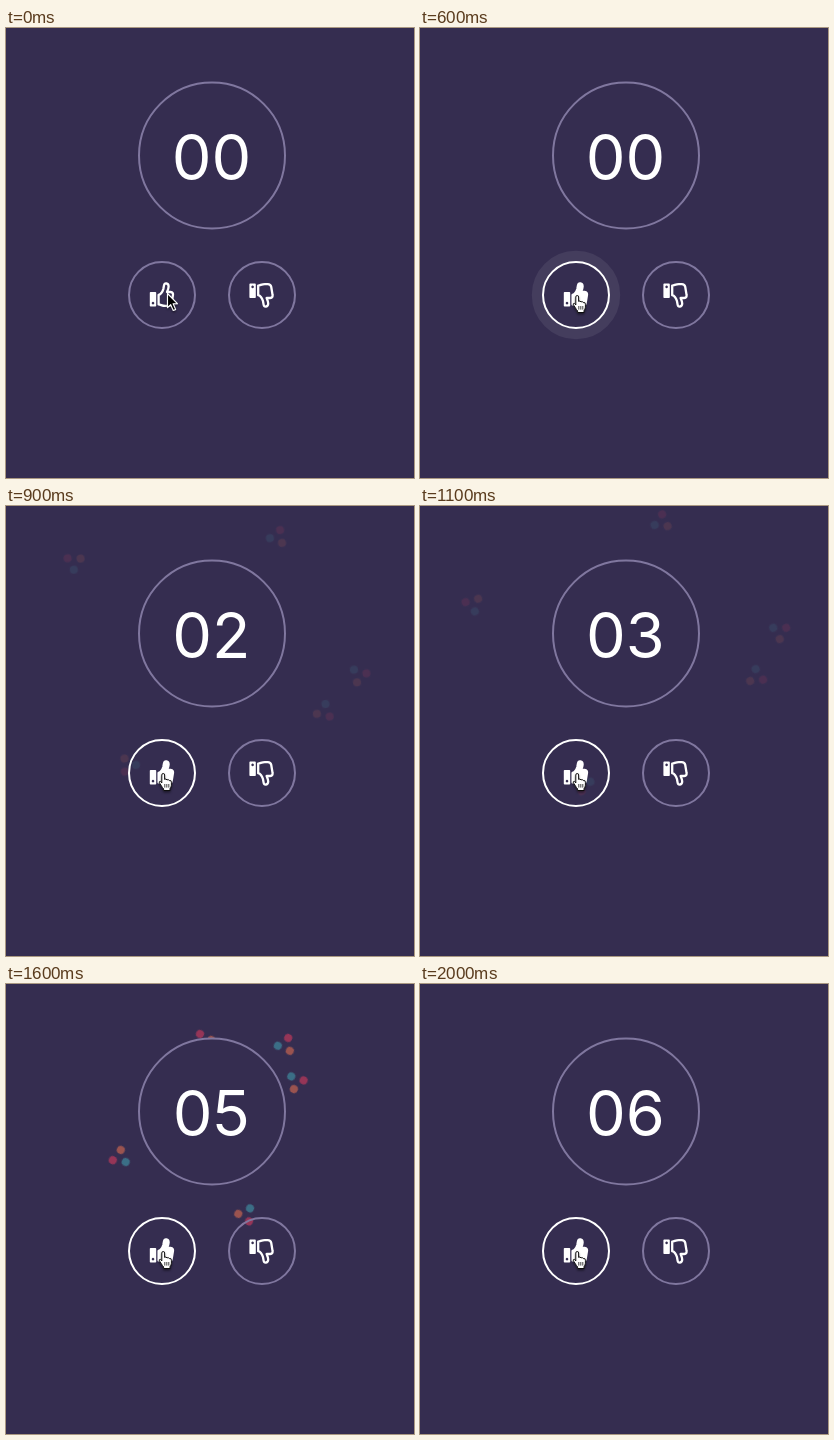
An HTML page that plays this animation: 408 by 450 pixels, repeating every 2100 ms.

```html
<!DOCTYPE html>
<html lang="en">
<head>
<meta charset="utf-8">
<title>Vote counter</title>
<style>
  html, body { margin: 0; width: 100%; height: 100%; overflow: hidden; background: #352d50; }
  svg { display: block; width: 100%; height: 100%; }
  .ring { fill: none; stroke: #80779f; stroke-width: 2; }
  .face { fill: #352d50; }
  .count { font: 400 63px Inter, Roboto, sans-serif; fill: #fff; text-anchor: middle; }
  .palm { stroke: #fff; stroke-width: 2.3; stroke-linejoin: round; }
  use { fill: none; }
  .hover use { fill: #fff; }
  .hover .ring { stroke: #fff; }
  .ripple { fill: none; stroke: #fff; }
</style>
</head>
<body>
<svg viewBox="0 0 408 450">
  <defs>
    <g id="thumb">
      <path fill="#fff" fill-rule="evenodd" d="M-11.4-3h4.8q.8 0 .8.8V10.7q0 .8-.8.8H-11.4q-.8 0-.8-.8V-2.2q0-.8.8-.8zM-9 6.8a1.3 1.3 0 1 0 .01 0z"/>
      <path class="palm" d="M-3.4-.2C-1.2-.8.6-3.6 1.4-6.2L2-9.6C2.5-12.4 6.6-12.2 6.6-8.6C6.6-6.6 5.6-4.4 5-3H8.6C10.8-3 11.3-1.2 10.9.4L9.6 8.2C9.2 10 8.2 10.9 6.2 10.9H3.2C.2 10.9-1.2 9.6-3.4 9.4z"/>
    </g>
    <filter id="shade" x="-50%" y="-50%" width="200%" height="200%">
      <feDropShadow dx="0" dy="1.5" stdDeviation="1.2" flood-color="#000" flood-opacity=".5"/>
    </filter>
  </defs>

  <g id="bursts"></g>

  <circle class="ring face" cx="206" cy="127.5" r="73"/>
  <text class="count" id="count" x="205.4" y="152">00</text>

  <circle class="ripple" id="ripple" cx="156" cy="267"/>
  <g id="up" transform="translate(156 267)">
    <circle class="ring" r="33"/>
    <use href="#thumb"/>
  </g>
  <g transform="translate(256 267)">
    <circle class="ring" r="33"/>
    <use href="#thumb" transform="translate(-.4 0) scale(1 -1)"/>
  </g>

  <path id="arrow" filter="url(#shade)" fill="#000" stroke="#fff" stroke-width="1.1" stroke-linejoin="round"
    d="M.5.5V14.6L3.7 11.6L6.2 17.4L8.6 16.4L6.1 10.7H10.4z"/>
  <g id="hand" transform="translate(152.6 267)" filter="url(#shade)">
    <path id="skin" stroke="#111" stroke-width="1" stroke-linejoin="round"
      d="M3.2 10V2Q3.2.5 4.6.5T6 2V6.4Q7.4 5.4 8.4 6.9Q9.8 6 10.6 7.5Q12.8 6.9 12.8 9.2V12.2Q12.6 14.4 11.4 15.6V17.5H5V15.8Q3.6 14.6 2.6 12.4L.8 9.8Q.4 8.2 1.8 8.3Z"/>
    <path fill="none" stroke="#111" stroke-width=".8" d="M6.2 11v3.6M8.2 11v3.6M10.2 11v3.6"/>
  </g>
</svg>
<script>
const LOOP = 2100, TICK = 100, LIFE = 300;
const NS = 'http://www.w3.org/2000/svg';
const $ = id => document.getElementById(id);
const add = (parent, tag) => parent.appendChild(document.createElementNS(NS, tag));
const set = (el, attrs) => { for (const k in attrs) el.setAttribute(k, attrs[k]); };
const show = (el, on) => el.setAttribute('visibility', on ? 'visible' : 'hidden');

// Each trio flies through two points and keeps its own tilt.
const trios = [
  { near: [-84, -59.5], far: [-123.7, -88.7], tilt: 100 },
  { near: [58.5, -40.1], far: [77.7, -82.7], tilt: 180 },
  { near: [92.5, 33.5], far: [136.7, 61.7], tilt: 235 },
  { near: [65, 60.6], far: [97.3, 92.3], tilt: 290 },
  { near: [-75.4, 78.2], far: [-100.7, 116], tilt: 7 }
];
const colors = ['#3f9fb0', '#e0395c', '#e8704e'];

// [start in ms, rotation in degrees]
const bursts = [[702, -8.5], [900, -25], [1110, 0], [1265, -40.5], [1500, -62], [1665, 8]]
  .map(([start, turn]) => {
    const g = add($('bursts'), 'g');
    set(g, { transform: `translate(206 127) rotate(${turn})` });
    const parts = trios.map(({ tilt }) => {
      const trio = add(g, 'g');
      colors.forEach((fill, i) => {
        const a = (tilt + i * 120) * Math.PI / 180;
        set(add(trio, 'circle'), { cx: 7.5 * Math.cos(a), cy: 7.5 * Math.sin(a), r: 4, fill });
      });
      return trio;
    });
    return { start, g, parts };
  });

function drawBurst({ start, g, parts }, t) {
  const u = (t - start) / LIFE;
  const live = u >= 0 && u < 1;
  show(g, live);
  if (!live) return;
  const spread = 1.12 * (1 - (1 - u) ** 2);
  const k = (spread - 0.62) / 0.35;
  set(g, { opacity: Math.min(1, 1.38 * (1 - u) ** 2.2) });
  parts.forEach((el, i) => {
    const { near, far } = trios[i];
    const [x, y] = near.map((n, j) => n + (far[j] - n) * k);
    set(el, { transform: `translate(${x} ${y})` });
  });
}

function drawRipple(t) {
  const grow = Math.min(1, Math.max(0, (t - 400) / 300));
  const fade = Math.min(1, Math.max(0, (900 - t) / 200));
  const w = 11.5 * grow * (2 - grow);
  set($('ripple'), { r: 34 + w / 2, 'stroke-width': w, opacity: 0.075 * fade });
  show($('ripple'), grow > 0 && fade > 0);
}

function draw(t) {
  const clicks = Math.min(6, Math.max(0, Math.floor((t - 500) / 200)));
  $('count').textContent = '0' + clicks;
  $('up').classList.toggle('hover', t >= 400);
  show($('arrow'), t < 200);
  set($('arrow'), { transform: t < 100 ? 'translate(161 265)' : 'translate(176 146)' });
  show($('hand'), t >= 200);
  set($('skin'), { fill: t < 500 ? '#c9c7cf' : '#fff' });
  drawRipple(t);
  bursts.forEach(b => drawBurst(b, t));
}

const began = performance.now();
function loop() {
  const t = (performance.now() - began) % LOOP;
  draw(Math.floor(t / TICK) * TICK);
  requestAnimationFrame(loop);
}
loop();
</script>
</body>
</html>
```
